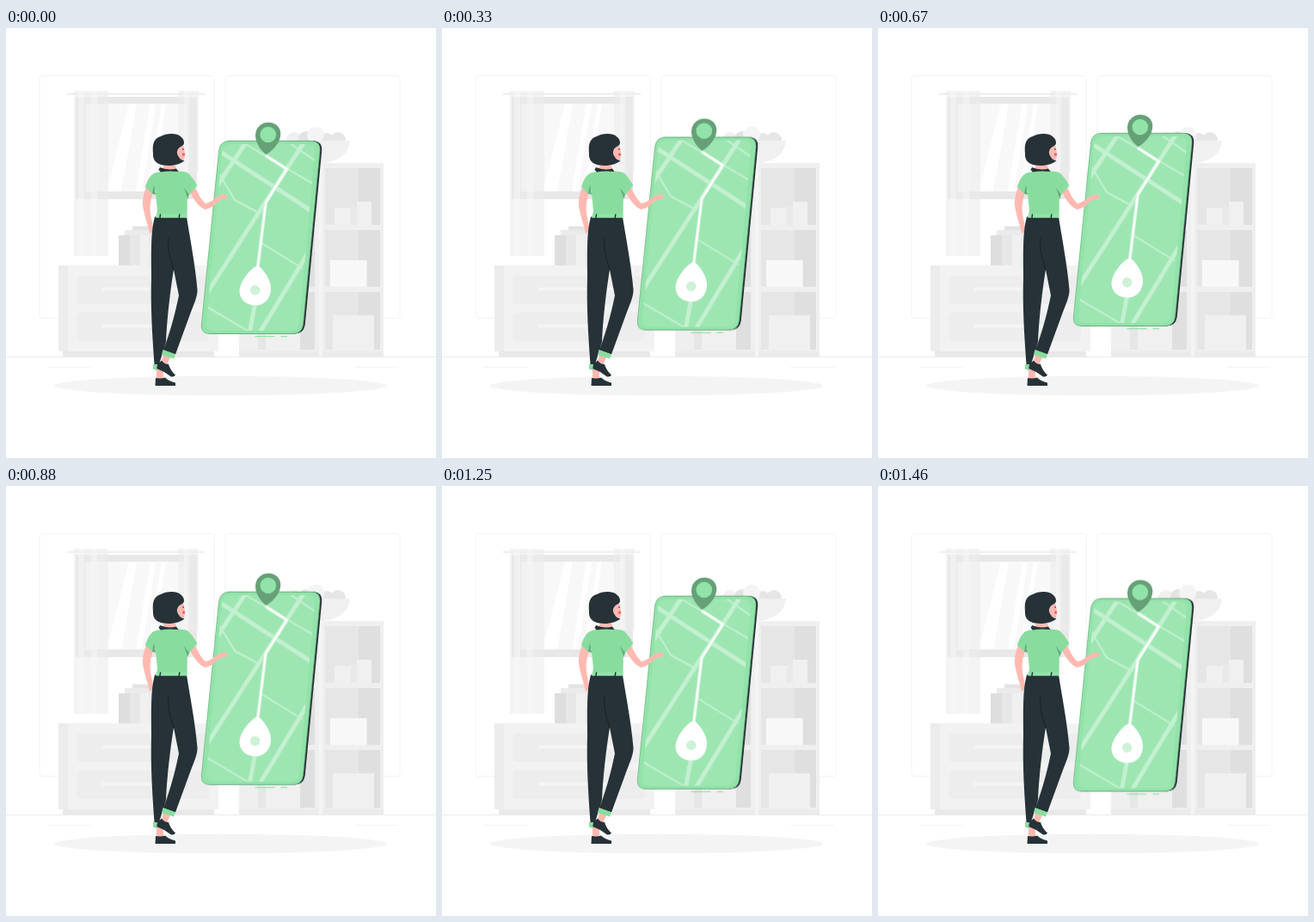
Write an HTML page that moves like this. It is 500 px wide and 500 px high and loops after 1500 ms.

```html
<!DOCTYPE html>
<html lang="en">
<head>
<meta charset="utf-8">
<title>Map on a phone</title>
<style>
html, body { margin: 0; width: 100%; height: 100%; overflow: hidden; background: #fff; }
svg { display: block; width: 100vw; height: 100vh; }
.float { animation: float 1.5s linear infinite; }
@keyframes float { 50% { transform: translateY(-10px); } }
.line { fill: none; stroke-linecap: round; stroke-linejoin: round; }
.dark { fill: #263238; }
.skin { fill: #ffb9b1; }
.shirt { fill: #88dd9e; }
</style>
</head>
<body>
<svg viewBox="0 0 500 500">
  <defs>
    <path id="face" d="M260 131.3H354Q366 131.3 365 143L345.500 345Q344 355.500 333 355.500H237Q226.500 355.500 227.300 345L247.500 143Q249 131.300 260 131.300Z"/>
    <path id="screen" d="M261 135H351Q360 135 359 145L348.500 262 341 343Q340 352 331 352H241Q232 352 233 343L251 145Q252 135 261 135Z"/>
    <clipPath id="clip"><use href="#screen"/></clipPath>
  </defs>

  <!-- walls and floor -->
  <g fill="none" stroke="#f4f4f4">
    <rect x="39" y="55.500" width="203.500" height="282" rx="3"/>
    <rect x="255" y="55.500" width="203" height="282" rx="3"/>
    <path d="M0 382.500H500" stroke="#ebebeb"/>
    <path d="M48 394.500H99M405 394.500H456" stroke="#f5f5f5"/>
  </g>
  <ellipse cx="249.500" cy="416" rx="193.500" ry="11.300" fill="#f4f4f4"/>

  <!-- window -->
  <path d="M81 80H222V199H81Z" fill="#e8e8e8"/>
  <path d="M81 80H92V199H81Z" fill="#e1e1e1"/>
  <path d="M92 88H211V190H92Z" fill="#f8f8f8"/>
  <path d="M143 88H152L134 190H117ZM168 88H174L158 190H151ZM181 88H186L170 190H165Z" fill="#fff"/>
  <path d="M71 75.500H231V78H71Z" fill="#f0f0f0"/>
  <path d="M79 73H119V265H79ZM200 73H224V168H200Z" fill="#ededed" opacity=".6"/>
  <path d="M84 73H91V265H84ZM99 73H106V265H99ZM207 73H213V168H207Z" fill="#f8f8f8" opacity=".55"/>

  <!-- books and dresser -->
  <path d="M147 230.500H172V276H147Z" fill="#e3e3e3"/>
  <path d="M138 235H170V276H138Z" fill="#ebebeb"/>
  <path d="M131 241H144V276H131Z" fill="#dedede"/>
  <path d="M144 241H156V276H144Z" fill="#e7e7e7"/>
  <path d="M156 241H167V276H156Z" fill="#f0f0f0"/>
  <path d="M66 376H242V382H66Z" fill="#e9e9e9"/>
  <path d="M61 276H247V376H61Z" fill="#f2f2f2"/>
  <path d="M61 276H72V376H61Z" fill="#ececec"/>
  <g fill="#ededed">
    <rect x="82" y="288" width="154" height="33" rx="5"/>
    <rect x="82" y="331" width="154" height="33" rx="5"/>
  </g>
  <path d="M112 303.500H207M112 346.500H207" stroke="#f5f5f5" stroke-width="3.500"/>

  <!-- shelves -->
  <path d="M271 157H439V382H271Z" fill="#efefef"/>
  <path d="M271 376H439V382H271Z" fill="#ebebeb"/>
  <path d="M293 163H359V229H293ZM293 235H359V301H293ZM293 307H359V374H293ZM371 163H435V229H371ZM371 235H435V301H371ZM371 307H435V374H371Z" fill="#e6e6e6"/>
  <path d="M342 163H359V229H342ZM342 235H359V301H342ZM342 307H359V374H342ZM410 163H435V229H410ZM410 235H435V301H410ZM410 307H435V374H410Z" fill="#dfdfdf"/>
  <path d="M364 157H368V382H364Z" fill="#f4f4f4"/>
  <path d="M302 334H342V374H302ZM382 209H404V229H382ZM408 202H425V229H408ZM380 334H428V374H380Z" fill="#f0f0f0"/>
  <path d="M401 207H408V229H401Z" fill="#e9e9e9"/>
  <path d="M377 270H419V301H377Z" fill="#f8f8f8"/>
  <path d="M419 270H420V301H419Z" fill="#ededed"/>

  <!-- fruit bowl -->
  <circle cx="335" cy="130" r="9" fill="#f0f0f0"/>
  <circle cx="349" cy="129" r="9" fill="#e3e3e3"/>
  <circle cx="373" cy="131" r="9" fill="#e6e6e6"/>
  <circle cx="386" cy="130" r="9" fill="#e6e6e6"/>
  <circle cx="360" cy="124.500" r="10" fill="#f4f4f4"/>
  <path d="M325 131H400Q397 155 366 157H359Q328 155 325 131Z" fill="#f0f0f0"/>

  <!-- phone -->
  <g class="float">
    <use href="#face" x="2.200" class="dark"/>
    <use href="#face" x="1.200" class="dark"/>
    <use href="#face" fill="#92e3a9" stroke="#69ae7d" stroke-width=".7"/>
    <use href="#screen" fill="#9de6b2"/>
    <g class="line" clip-path="url(#clip)" stroke="#c3f0d0" stroke-width="5">
      <path d="M240 138L360 216M281 130L243 187M347 132L230 314M355 255L294 356M290 318L283 356"/>
      <path stroke-width="2" d="M330 134L362 156M326 163L362 184M248 170L266 200 294 215M297 250L344 279M230 322L286 355M277 134L304 150"/>
    </g>
    <path class="line" d="M303 149L326.500 164 302 203 293 276" stroke="#d8f6e0" stroke-width="4"/>
    <path class="line" d="M303 149L326.500 164 302 203 293 276" stroke="#fff" stroke-width="2"/>
    <path d="M292.500 276C299 280 308 292 308 303C308 315 300 322.500 290 322.500C279 322.500 271.500 315 271.500 306C271.500 295 284 280 292.500 276Z" fill="#fff"/>
    <circle cx="289.700" cy="304.800" r="5.700" fill="#cdf2d7"/>
    <path d="M302.500 147C297 143 290 134 290 125C290 116 297 109.800 305 109.800C313.500 109.800 319.300 115.500 319.300 123C319.300 133 310 143 302.500 147Z" fill="#66a077"/>
    <circle cx="304.800" cy="124" r="9.300" fill="#92e3a9"/>
    <path d="M289.500 358.600H312.500M319.500 358.600H327" stroke="#92e3a9" stroke-width="1.300"/>
  </g>

  <!-- woman: arms -->
  <path class="skin" d="M163 185C159 195 158 204 160 212C162 222 165 229 167 239L172 236 170 226C167 214 166 204 172 190Z"/>
  <path class="skin" d="M214 191L220 186C224 194 228 201 232 204C238 203 242 199 246 196C249 193.500 253 193.500 257 194.200C258.500 195.500 257.500 198 255 198.800L248 200.500C243 206 238 210 231 211C224 208 218 199 214 191Z"/>

  <!-- feet -->
  <path class="skin" d="M175 396H183V409H175ZM183 380L191 383 187 392 181 389Z"/>
  <path class="dark" d="M174 407Q180 408 185 406.500Q190 411 197 412.500V416H173.500Z"/>
  <path class="dark" d="M175 392L181 386.500Q184 391 189 391Q191 398 197 403.500Q196 406 192 405.500L184 400Q180 398 175 396Z"/>
  <path class="shirt" d="M171 391H176L175 398 171 396.500Z"/>

  <!-- trousers -->
  <path class="dark" d="M173 219.500H210C214 245 220 275 222.500 304C223 312 218 322 214 333L197 379.500 183 374.500C191 353 197 331 201 311L195 281C191 305 187 340 186 365L178 391H172.500C170 355 168 325 169 290C169 260 168 238 173 219.500Z"/>
  <path class="line" d="M189 244C187 258 192 270 195 281" stroke="#172126" stroke-width="1"/>
  <path class="shirt" d="M182.500 374L197 379.500 195 384.500 181 380Z"/>

  <!-- top -->
  <path class="skin" d="M185 156H196L199 167H181Z"/>
  <path class="shirt" d="M175 168Q188 164.500 209 167.500C214 169 218 176 222.500 183L213 194 211 191 210.500 220.500H174.500L176 212 173.500 188 170 193 162 185C164 178 168 169 175 168Z"/>
  <path d="M207 186L213 193.500 211.500 199Z" fill="#65ae79"/>
  <path d="M172 182L174 194 170 192.500Z" fill="#65ae79"/>
  <path d="M174.800 216.500H210.500V220.500H174.300Z" fill="#92e3a9"/>
  <path class="line" d="M179.500 217L178.800 222M201.800 217L201 222" stroke="#263238" stroke-width="1.500"/>
  <path class="dark" d="M179 162Q188 166 198 163.500L200.500 167Q188 166 180 167.500L177.500 165Z"/>

  <!-- head -->
  <path class="skin" d="M197 137H206.500L208.500 147 207 153Q203 156 197 153Z"/>
  <path class="dark" d="M180 126C187 121.500 200 122 204 127C208 131 208 136 204 137.500C199 140 197 145 201 150Q203 154 207.500 154C203 159 192 161 183 159.500C175 158 170.500 154 171 146C170 135 172 128 180 126Z"/>
  <path d="M206 140V142" stroke="#263238"/>
  <circle cx="206.500" cy="147" r="1.500" fill="#f2545f"/>
</svg>
</body>
</html>
```
